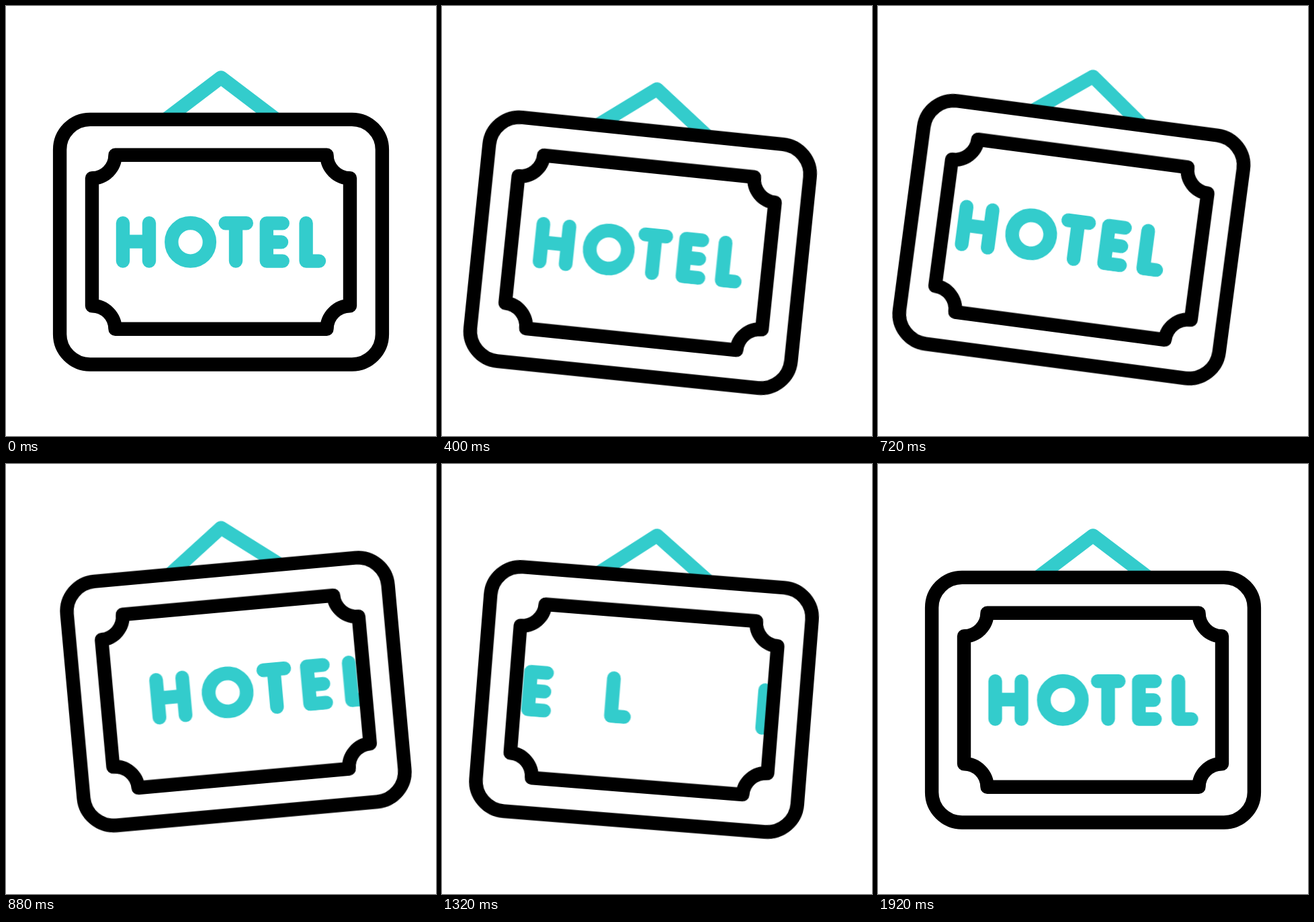
Animation, 640 px wide and 640 px high, one loop 2 s. Source, as an HTML page:

```html
<!DOCTYPE html>
<html lang="en">
<head>
<meta charset="utf-8">
<title>Hotel sign</title>
<style>
  html, body { margin: 0; width: 100%; height: 100%; overflow: hidden; background: #fff; }
  svg { display: block; width: 100%; height: 100%; }

  svg, .letters { fill: none; stroke-width: 20.4; stroke-linecap: round; stroke-linejoin: round; }
  .rope { stroke: #3cc; stroke-linecap: butt; }
  .board { stroke: #000; }
  .word { stroke: #3cc; }

  .bob, .swing, .out use { animation: 2s cubic-bezier(.333, 0, .667, 1) infinite; }
  .bob { animation-name: bob; }
  .swing { animation-name: swing; transform-origin: 320px 106.4px; }

  /* --i counts the letters from the left */
  .out use { animation-name: leave; }
  .in { animation: reveal 2s step-end infinite; }
  .in use {
    animation: enter 2s cubic-bezier(.4, .455, .8, .96) infinite backwards;
    animation-delay: calc(1420ms - var(--i) * 80ms);
  }

  @keyframes bob {
    0%, 6% { transform: translateY(0); }
    26% { transform: translateY(22px); }
    42% { transform: translateY(-12px); }
    58%, 100% { transform: translateY(0); }
  }
  @keyframes swing {
    0%, 6% { transform: rotate(0deg); }
    32% { transform: rotate(10.5deg); }
    48% { transform: rotate(-8deg); }
    64% { transform: rotate(5deg); }
    75%, 100% { transform: rotate(0deg); }
  }
  /* Pull back a little, then shoot out to the right */
  @keyframes leave {
    0%, 16% { transform: translateX(0); }
    36% { transform: translateX(-15px); }
    74%, 100% { transform: translateX(calc(368px + var(--i) * 33px)); }
  }
  /* Come back from the left, last letter first */
  @keyframes enter {
    0% { transform: translateX(-354px); }
    25%, 46% { transform: translateX(.5px); }
    46.01%, 100% { transform: translateX(-354px); }
  }
  @keyframes reveal {
    0% { visibility: hidden; }
    50%, 100% { visibility: visible; }
  }
</style>
</head>
<body>
<svg viewBox="0 0 640 640" role="img" aria-label="HOTEL">
  <defs>
    <path id="h" d="M174 323.2V379.6M213 323.2V379.6M174 350.6H213"/>
    <circle id="o" cx="274.6" cy="351.3" r="28.3"/>
    <path id="t" d="M326.6 323.2H357.8M342 323.2V379.6"/>
    <path id="e" d="M411.7 323.4H387.8V379.6H411.7M387.8 351.4H410"/>
    <path id="l" d="M446.6 323.2V379.6H466"/>
    <clipPath id="pane"><rect x="137.5" y="222" width="365" height="259"/></clipPath>
  </defs>
  <g class="bob">
    <g class="swing">
      <path class="rope" d="M237.5 169L320 106.4L402.5 169"/>
      <rect class="board" x="80.1" y="168.9" width="479.8" height="364.6" rx="45"/>
      <g class="word" clip-path="url(#pane)">
        <g class="out">
          <use href="#h" style="--i:0"/>
          <use href="#o" style="--i:1"/>
          <use href="#t" style="--i:2"/>
          <use href="#e" style="--i:3"/>
          <use href="#l" style="--i:4"/>
        </g>
        <g class="in">
          <use href="#h" style="--i:0"/>
          <use href="#o" style="--i:1"/>
          <use href="#t" style="--i:2"/>
          <use href="#e" style="--i:3"/>
          <use href="#l" style="--i:4"/>
        </g>
      </g>
      <path class="board" d="M162.5 221.8H477.5A34.5 34.5 0 0 0 512 256.3V446.3A34.5 34.5 0 0 0 477.5 480.8H162.5A34.5 34.5 0 0 0 128 446.3V256.3A34.5 34.5 0 0 0 162.5 221.8Z"/>
    </g>
  </g>
</svg>
</body>
</html>
```
